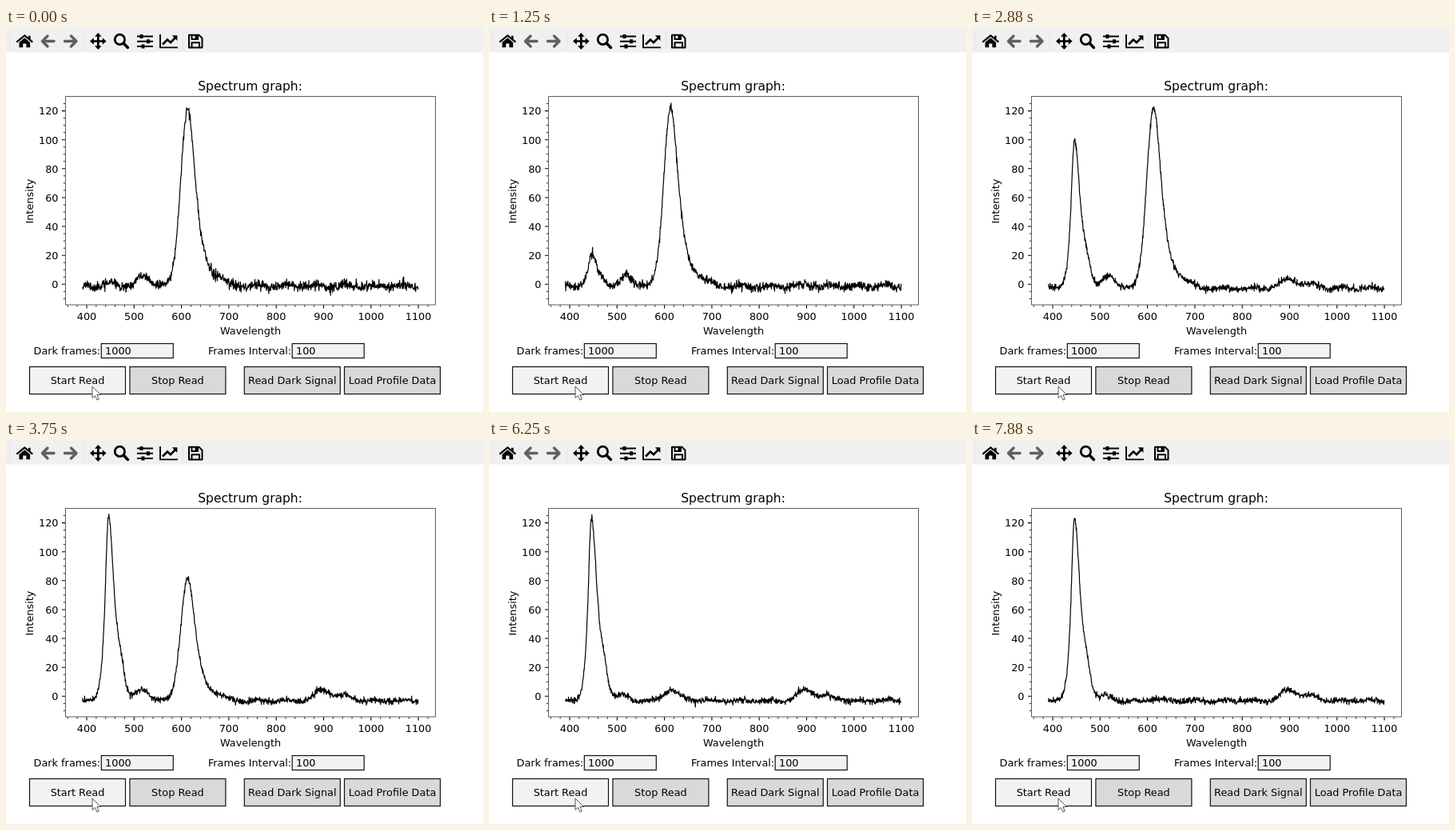
These frames come from a looping animation (597 by 480 pixels, 8000 ms). An HTML page:

```html
<!DOCTYPE html>
<html lang="en">
<head>
<meta charset="utf-8">
<title>Spectrum graph</title>
<style>
  html, body { margin: 0; width: 100%; height: 100%; overflow: hidden; background: #fff; }
  svg { display: block; width: 597px; height: 480px; }
  text { font: 12.85px "DejaVu Sans", sans-serif; fill: #000; }
  .mid { text-anchor: middle; }
  .end { text-anchor: end; }
  .title { font-size: 15.5px; }
  .line { fill: none; stroke: #000; }
  .dim { fill: none; stroke: #606060; stroke-width: 3.4; stroke-linecap: round; stroke-linejoin: round; }
  .box rect { stroke: #111; stroke-width: 1.2; }
</style>
</head>
<body>
<svg viewBox="0 0 597 480">
  <rect width="597" height="480" fill="#fff"/>
  <rect width="597" height="30.6" fill="#f0f0f0"/>
  <path d="M4.5 5V27" stroke="#c8c8c8" stroke-dasharray="1 2"/>
  <path d="M97.5 5V27M221.5 5V27" stroke="#e6e6e6"/>

  <!-- toolbar icons -->
  <path class="line" stroke-width="2.2" d="M13.3 17.6L23.3 9.5L33.3 17.6"/>
  <path d="M16.5 18L23.3 12.2L30.1 18V24.3H25.4V19.6H21.2V24.3H16.5ZM28 9.8h2.6v5l-2.6-2.4z"/>
  <path class="dim" d="M52 10L45.5 16.5L52 23M46 16.5H60"/>
  <path class="dim" d="M81.5 10L88 16.5L81.5 23M87.5 16.5H73.5"/>
  <path class="line" stroke-width="2.7" d="M115.3 9V24M108 16.5H123"/>
  <path d="M115.3 6l4.3 4.8h-8.6zM115.3 27l4.3-4.8h-8.6zM105 16.5l4.8-4.3v8.6zM125.6 16.5l-4.8-4.3v8.6z"/>
  <circle class="line" stroke-width="2.8" cx="142.4" cy="14.4" r="6.2"/>
  <path class="line" stroke-width="3.6" stroke-linecap="round" d="M147.6 19.6L152.4 24.4"/>
  <path class="line" stroke-width="1.9" d="M164 10.5H184M164 16.8H184M164 23H184"/>
  <path d="M167.5 8h4v5h-4zM176 14.3h4v5h-4zM169.5 20.5h4v5h-4z"/>
  <path class="line" stroke-width="1.9" d="M193 8V24.4H215"/>
  <path class="line" stroke-width="2.6" d="M196 20.5L202 14.5L206 18.2L212 12"/>
  <path d="M207.8 9.3h6.6v6.6z"/>
  <path class="line" stroke-width="2" stroke-linejoin="round" d="M229 8.8H241.5L245.5 12.8V24.6H229ZM232.5 24V18.3H242V24M232.5 9V14H240V9"/>
  <path d="M236.5 9h3.5v5h-3.5z"/>

  <text class="mid title" x="305.6" y="78.3">Spectrum graph:</text>
  <text class="mid" x="306" y="383">Wavelength</text>
  <text class="mid" transform="translate(33.6 216.6) rotate(-90)">Intensity</text>
  <g id="labels"></g>
  <path id="major" class="line" stroke-width="1.1"/>
  <path id="minor" class="line" stroke-width=".85"/>
  <path id="trace" class="line" stroke-width="1.2" stroke-linejoin="round"/>
  <rect fill="none" stroke="#5c5c5c" x="74.5" y="85.5" width="463" height="260.5"/>

  <text class="end" x="118.2" y="407.6">Dark frames:</text>
  <text class="end" x="357.2" y="407.6">Frames Interval:</text>
  <g id="controls" class="box"></g>
  <path d="M108 448V462.5L111.4 459.4L113.9 465L116.3 464L113.9 458.5H118.5Z" fill="#fff" stroke="#555"/>
</svg>
<script>
const LOOP = 8000, STEP = 125;
const byId = id => document.getElementById(id);
const px = nm => 101 + (nm - 400) * 0.593;
const py = v => 320.3 - v * 1.806;

function add(parent, tag, attrs, text) {
  const el = document.createElementNS("http://www.w3.org/2000/svg", tag);
  for (const k in attrs) el.setAttribute(k, attrs[k]);
  if (text !== undefined) el.textContent = text;
  return parent.appendChild(el);
}

function drawAxes() {
  let major = "", minor = "";
  const labels = byId("labels");
  for (let nm = 360; nm <= 1130; nm += 20) {
    const x = px(nm);
    if (nm % 100) minor += `M${x} 346v2.7`;
    else {
      major += `M${x} 346v4.6`;
      add(labels, "text", { class: "mid", x, y: 365 }, nm);
    }
  }
  for (let v = -10; v <= 125; v += 5) {
    const y = py(v);
    if (v % 20) minor += `M74.5 ${y}h-2.7`;
    else {
      major += `M74.5 ${y}h-4.6`;
      add(labels, "text", { class: "end", x: 65.5, y: y + 4.8 }, v);
    }
  }
  byId("major").setAttribute("d", major);
  byId("minor").setAttribute("d", minor);
}

function drawControls() {
  const g = byId("controls");
  const box = (x, y, width, height, fill) => add(g, "rect", { x, y, width, height, fill });
  const field = (x, label) => {
    box(x, 394.5, 90, 18, "#f2f2f4");
    add(g, "text", { x: x + 4.8, y: 407.8 }, label);
  };
  const button = (x, label, fill = "#d9d9d9") => {
    box(x, 423.5, 120, 34, fill);
    add(g, "text", { class: "mid", x: x + 60, y: 444.6 }, label);
  };
  field(119.3, "1000");
  field(358.2, "100");
  button(29.5, "Start Read", "#f2f2f2");
  button(154.9, "Stop Read");
  button(298.3, "Read Dark Signal");
  button(423.5, "Load Profile Data");
}

const bump = (x, c, w) => Math.exp(-(((x - c) / w) ** 2));
const sech = x => 1 / Math.cosh(x);

// Both peaks are steep on the left and have a long right shoulder
const redPeak = nm => (nm < 613 ? bump(nm, 613, 20.5) : sech((nm - 613) / 14.5))
  + .035 * bump(nm, 672, 27);
const bluePeak = nm => sech((nm - 446) / (nm < 446 ? 6.3 : 10.5)) + .11 * bump(nm, 472, 11);

function random(seed) {
  return () => {
    seed = seed + 0x6D2B79F5 | 0;
    let t = Math.imul(seed ^ seed >>> 15, 1 | seed);
    t = t + Math.imul(t ^ t >>> 7, 61 | t) ^ t;
    return ((t ^ t >>> 14) >>> 0) / 4294967296;
  };
}
const gauss = rnd => Math.sqrt(-2 * Math.log(1 - rnd())) * Math.cos(2 * Math.PI * rnd());

// Share of blue light: eases from 0 to nearly 1
function blueShare(ms) {
  const u = Math.min(1, Math.max(0, (ms - 600) / 6300));
  return .99 * (1 - (1 - u) ** 1.33);
}

function tracePath(step) {
  const share = blueShare(step * STEP);
  // The stronger peak always fills the scale
  const top = Math.max(share, 1 - share);
  const blue = share / top, red = (1 - share) / top;
  const base = -1.2 - 2 * blue;
  const fresh = random(step * 7919 + 11), fixed = random(5);
  const noise = 1.75 - .65 * blue;
  let d = "";
  for (let nm = 391; nm <= 1100; nm += .65) {
    const v = base
      + (1.1 - .4 * blue) * Math.cos((nm - 450) / 62 * 2 * Math.PI)
      + (122.5 - base) * (red * redPeak(nm) + blue * bluePeak(nm))
      + red * (6.5 * bump(nm, 520, 17) + 2 * bump(nm, 450, 16) + 1.6 * bump(nm, 550, 16))
      + blue * (2.8 * bump(nm, 513, 18) + 7.5 * bump(nm, 898, 23) + 3.2 * bump(nm, 942, 28))
      + noise * (.9 * gauss(fresh) + .4 * gauss(fixed));
    d += `${d ? "L" : "M"}${px(nm).toFixed(2)} ${py(v).toFixed(2)}`;
  }
  return d;
}

let shown = -1;
const start = performance.now();
function tick() {
  const step = Math.floor((performance.now() - start) % LOOP / STEP);
  if (step !== shown) {
    shown = step;
    byId("trace").setAttribute("d", tracePath(step));
  }
  requestAnimationFrame(tick);
}

drawAxes();
drawControls();
tick();
</script>
</body>
</html>
```
